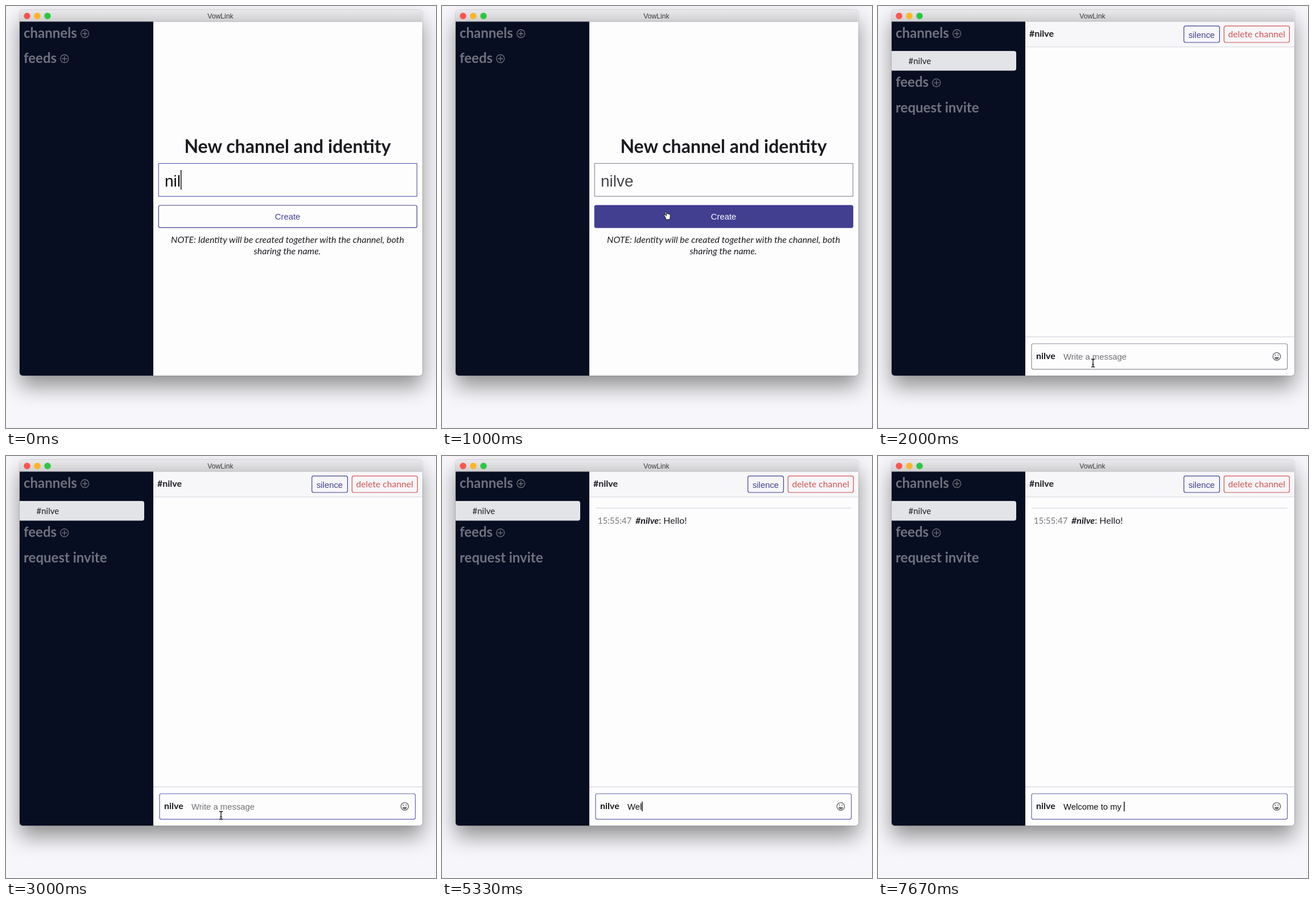
These frames come from a looping animation (756 px wide and 741 px high, 8000 ms). An HTML page:

```html
<!DOCTYPE html>
<html lang="en">
<head>
<meta charset="utf-8">
<title>VowLink</title>
<style>
  html, body { margin: 0; width: 100%; height: 100%; overflow: hidden; background: #f7f6fa; }
  .shadow {
    position: absolute; left: 24px; top: 7px; width: 707.5px; height: 642px; border-radius: 5px;
    box-shadow: 0 0 1.5px rgba(0,0,0,.45), 0 19px 36px rgba(0,0,0,.42);
  }
  svg { position: absolute; left: 0; top: 0; }
  text { font: 16px Lato, sans-serif; fill: #1b1b20; white-space: pre; }
  .bold { font-weight: 700; }
  .mid { text-anchor: middle; }
  .side text { font-size: 24px; font-weight: 700; fill: #70727e; }
  .plus { fill: none; stroke: #70727e; stroke-width: 1.3; }
  .sys { font-family: "Liberation Sans", Arial, sans-serif; font-size: 14.85px; }
  .box { fill: none; stroke: #8b8d95; stroke-width: 1.2; }
  .box.focus { stroke: #6063ad; }
  .rule { stroke: #dddce3; stroke-width: 1.3; }
  .indigo { fill: #40418f; }
  .button { fill: #fefdfe; stroke: #40418f; stroke-width: 1.2; }
  .hover .button { fill: #423f91; }
  .hover text { fill: #fff; }
  .pointer { stroke: #fff; stroke-width: .8; stroke-linejoin: round; }
</style>
</head>
<body>
<div class="shadow"></div>
<svg width="756" height="741" viewBox="0 0 756 741">
  <defs>
    <linearGradient id="bar" x2="0" y2="1">
      <stop stop-color="#e9e8ea"/><stop offset="1" stop-color="#cfced0"/>
    </linearGradient>
    <clipPath id="frame"><rect x="24" y="7" width="707.5" height="642" rx="5"/></clipPath>
    <g id="plus" class="plus"><circle r="7"/><path d="M-4.5 0h9M0-4.5v9"/></g>
  </defs>

  <g clip-path="url(#frame)">
    <rect x="24" y="7" width="708" height="643" fill="#fefdfe"/>
    <rect x="24" y="7" width="708" height="20" fill="url(#bar)"/>
    <path d="M24 27.2h708" stroke="#b3b2b5"/>
    <rect x="24" y="27.5" width="235" height="622" fill="#080e21"/>
  </g>
  <circle cx="37" cy="17.5" r="5.7" fill="#fc5550"/>
  <circle cx="55" cy="17.5" r="5.7" fill="#fdb528"/>
  <circle cx="73" cy="17.5" r="5.7" fill="#2bc740"/>
  <text class="sys mid" x="377" y="22" style="font-size:12.2px;fill:#3b3b3d">VowLink</text>

  <g class="side">
    <text x="31" y="56">channels</text>
    <use href="#plus" x="138.7" y="48.5"/>
    <g id="feeds">
      <text x="31" y="100">feeds</text>
      <use href="#plus" x="102.7" y="92.5"/>
    </g>
  </g>

  <g id="create">
    <text class="bold mid" x="495" y="258" style="font-size:32px">New channel and identity</text>
    <rect id="nameBox" class="box" x="268.3" y="276.5" width="454.2" height="57.7"/>
    <text id="name" class="sys" x="279" y="317" style="font-size:28px"></text>
    <g id="submit">
      <rect class="button" x="268.3" y="350" width="454.2" height="39.2" rx="3"/>
      <text class="sys mid indigo" x="495" y="375">Create</text>
    </g>
    <g font-style="italic">
      <text class="mid" x="495" y="416" style="font-style:italic">NOTE: Identity will be created together with the channel, both</text>
      <text class="mid" x="494.5" y="436" style="font-style:italic">sharing the name.</text>
    </g>
  </g>

  <g id="chat">
    <path d="M24 79h215a4 4 0 0 1 4 4v26.5a4 4 0 0 1-4 4h-215z" fill="#e3e4e8"/>
    <text x="53.5" y="101.5" style="font-size:15px">#nilve</text>
    <g class="side"><text x="31" y="187">request invite</text></g>

    <rect x="259" y="27.7" width="472.5" height="44" fill="#f7f6f9"/>
    <path class="rule" d="M259 71.8h472.5M259 581h472.5"/>
    <text class="bold" x="266" y="54">#nilve</text>
    <g fill="none" stroke-width="1.2">
      <rect x="537.8" y="35.2" width="62.7" height="28.8" rx="3" stroke="#40418f"/>
      <rect x="608.4" y="35.2" width="115" height="28.8" rx="3" stroke="#d05451"/>
    </g>
    <text class="sys mid indigo" x="569" y="56">silence</text>
    <text class="mid" x="665.7" y="55" style="font-size:15.7px;fill:#d05451">delete channel</text>

    <g id="message">
      <path class="rule" d="M270 91.5h450"/>
      <text x="273.7" y="119" style="font-size:15px;fill:#77777d">15:55:47</text>
      <text x="340" y="119"><tspan font-weight="700" font-style="italic">#nilve</tspan>: Hello!</text>
    </g>

    <rect id="chatBox" class="box" x="270" y="593" width="449.7" height="44.8" rx="3"/>
    <text class="bold" x="278" y="620">nilve</text>
    <text id="hint" class="sys" x="326" y="621" style="fill:#707075">Write a message</text>
    <text id="draft" class="sys" x="326" y="621"></text>
    <g transform="translate(701 615.3)" fill="none" stroke="#66666b" stroke-width="1.4">
      <circle r="6.7"/>
      <path d="M-3.8 1.2h7.6a3.8 3.6 0 0 1-7.6 0z" fill="#66666b" stroke="none"/>
      <path d="M-3.2-2.2h1.8M1.4-2.2h1.8" stroke-width="1.8"/>
    </g>
  </g>

  <rect id="caret" width="1.4"/>
  <g id="beam" fill="none" stroke="#111" stroke-width="1.3">
    <path d="M-3-7q3 0 3 2.2q0-2.2 3-2.2M0-5V5M-3 7q3 0 3-2.2q0 2.2 3 2.2M-1.5 2.5h3"/>
  </g>
  <path id="arrow" class="pointer" d="M0 0v12.6l2.9-2.7 1.9 4.4 2.1-.9-1.9-4.2h4z"/>
  <path id="hand" fill="#fff" stroke="#111" stroke-linejoin="round"
    d="M-1.6 1V-5.3q-.2-1.5-1.3-1.5t-1.1 1.5l1 4.8-1.6-1.2q-1.3-.6-1.6.5l3 4.5 1.2 3.7h6.3l1-3.6V-1q-.2-1.5-1.6-1.2-.5-1.2-1.9-.8-.6-1.1-2-.6"/>
</svg>

<script>
const DURATION = 8000;
const $ = id => document.getElementById(id);

// start, scene, typed text, caret shown, pointer [kind, x, y]
const hand = ["hand", 396, 368], arrow = ["arrow", 394, 360], beam = ["beam", 378, 631];
const steps = [
  [0,    "name",  "nil",   1],
  [330,  "name",  "nilve", 1, ["beam", 398.5, 312]],
  [670,  "hover", "nilve", 1, hand],
  [1000, "hover", "nilve", 0, hand],
  [1330, "idle",  "", 0, arrow],
  [2000, "idle",  "", 0, ["beam", 378, 627]],
  [2330, "chat",  "", 1, beam],
  [3000, "chat",  "", 0, beam],
  [3330, "chat",  "", 1, beam],
  [3670, "chat",  "H", 1],
  [4000, "chat",  "Hell", 1],
  [4330, "chat",  "Hello!", 1],
  [4670, "sent",  "", 1],
  [5000, "sent",  "We", 1],
  [5330, "sent",  "Wel", 1],
  [5670, "sent",  "Welcom", 1],
  [6000, "sent",  "Welcome to", 1],
  [6330, "sent",  "Welcome to m", 1],
  [6670, "sent",  "Welcome to my ", 1],
  [7000, "sent",  "Welcome to my ", 0],
  [7670, "sent",  "Welcome to my ", 1],
];

const show = (id, on) => { $(id).style.display = on ? "" : "none"; };

function placeCaret(field, y, height) {
  const x = +field.getAttribute("x") + field.getComputedTextLength();
  const caret = $("caret");
  caret.setAttribute("x", x);
  caret.setAttribute("y", y);
  caret.setAttribute("height", height);
}

function render([, scene, typed, caret, pointer]) {
  const naming = scene === "name" || scene === "hover";
  show("create", naming);
  show("chat", !naming);
  show("message", scene === "sent");
  show("hint", !typed);
  show("caret", caret);
  $("feeds").setAttribute("transform", `translate(0 ${naming ? 0 : 42.3})`);
  $("submit").classList.toggle("hover", scene === "hover");
  $("nameBox").classList.toggle("focus", caret);
  $("chatBox").classList.toggle("focus", scene !== "idle");

  const field = $(naming ? "name" : "draft");
  field.textContent = typed;
  field.style.fill = !naming || caret ? "#0c0c0e" : "#454548";
  if (naming) placeCaret(field, 288, 34.5);
  else placeCaret(field, 607, 17);

  for (const kind of ["beam", "arrow", "hand"]) show(kind, pointer && pointer[0] === kind);
  if (pointer) $(pointer[0]).setAttribute("transform", `translate(${pointer[1]} ${pointer[2]})`);
}

const start = performance.now();
let current;

function tick() {
  const time = (performance.now() - start) % DURATION;
  const step = steps.findLast(([from]) => from <= time);
  if (step !== current) render(current = step);
  requestAnimationFrame(tick);
}
tick();
</script>
</body>
</html>
```
